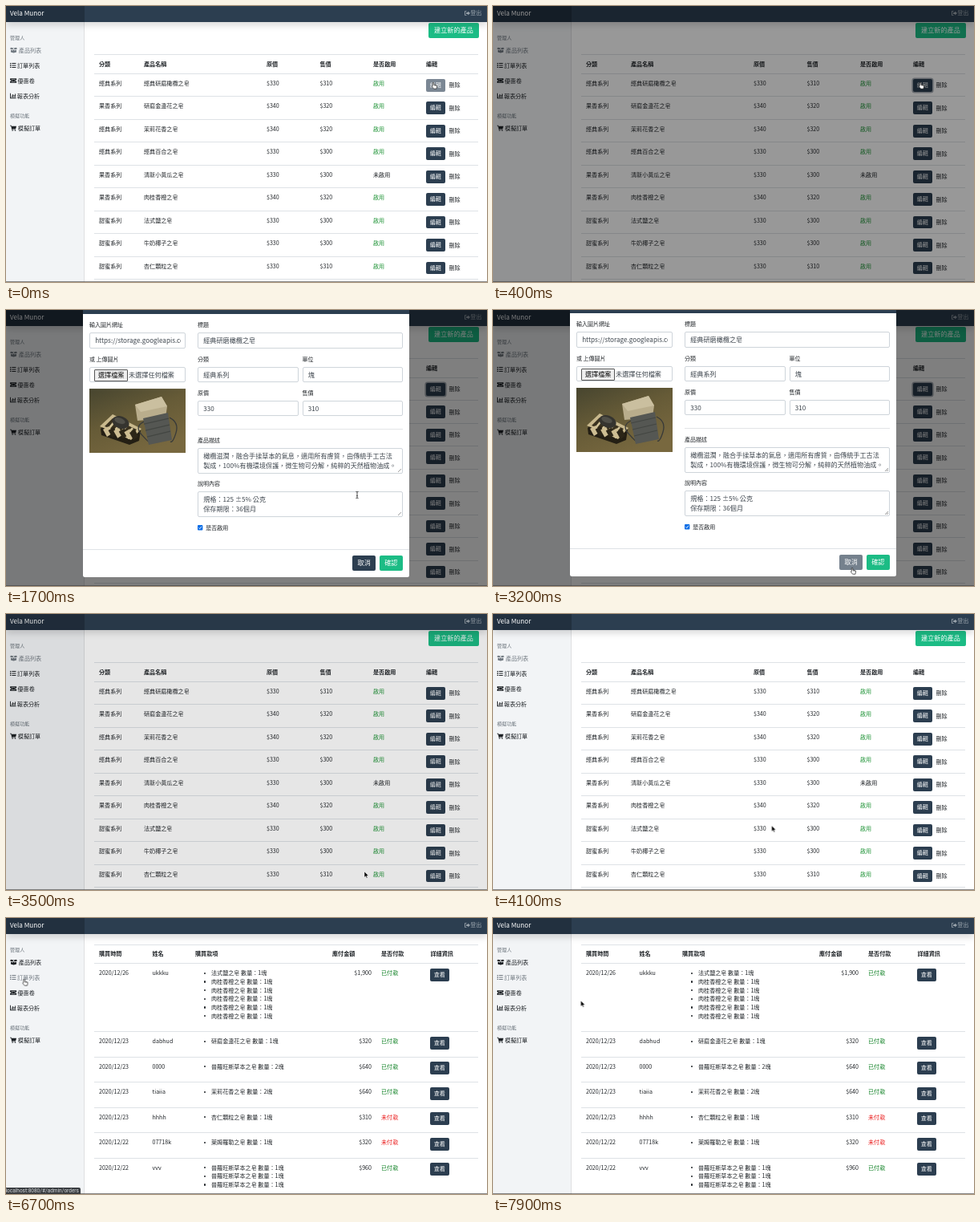
An HTML page that plays this animation: 600 px wide and 344 px high, repeating every 8 s.

```html
<!DOCTYPE html>
<html lang="zh-Hant">
<head>
<meta charset="utf-8">
<title>產品管理</title>
<style>
html, body { margin: 0; width: 100%; height: 100%; overflow: hidden; background: #fff; }
body { font-family: "Noto Sans CJK TC", "Noto Sans TC", "Noto Sans", sans-serif; color: #212529; }
#stage { position: relative; width: 600px; height: 344px; overflow: hidden; background: #fff; }
#stage div, #stage svg { position: absolute; box-sizing: border-box; }
.layer { left: 0; top: 0; width: 600px; height: 344px; }
.t { white-space: pre; line-height: 12px; height: 12px; }
.btn { border-radius: 2px; text-align: center; color: #fff; white-space: pre; font-weight: 500; }
.field { border: .6px solid #ced4da; border-radius: 2px; background: #fff; }
.grip { right: 1px; bottom: 1px; width: 4px; height: 4px;
  background: linear-gradient(135deg, transparent 48%, #999 49% 58%, transparent 59% 74%, #999 75% 84%, transparent 85%); }
svg { overflow: visible; }
</style>
</head>
<body>
<div id="stage"></div>
<script>
const LOOP = 8000;
const DARK = '#2c3e50', GREEN = '#1cbc85', GREY = '#75818d', LINE = '#dee2e6';
const stage = document.getElementById('stage');

function add(parent, cls, css = {}) {
  const el = document.createElement('div');
  el.className = cls;
  Object.assign(el.style, css);
  parent.append(el);
  return el;
}
function box(parent, x, y, w, h, css = {}, cls = '') {
  return add(parent, cls, { left: x + 'px', top: y + 'px', width: w + 'px', height: h + 'px', ...css });
}
// y is the visual middle of the line
function text(parent, x, y, str, size = 7.1, css = {}) {
  const el = add(parent, 't', { left: x + 'px', top: y - 6.4 + 'px', fontSize: size + 'px', ...css });
  el.textContent = str;
  return el;
}
function button(parent, x, y, w, h, str, size, color = DARK) {
  const el = box(parent, x, y, w, h,
    { background: color, fontSize: size + 'px', lineHeight: h - .8 + 'px' }, 'btn');
  el.textContent = str;
  return el;
}
function svg(parent, x, y, w, h, body, css = '') {
  parent.insertAdjacentHTML('beforeend',
    `<svg width="${w}" height="${h}" viewBox="0 0 ${w} ${h}" style="left:${x}px;top:${y}px;${css}">${body}</svg>`);
  return parent.lastElementChild;
}
const rule = (p, y, color = LINE, h = .7) => box(p, 110, y, 479, h, { background: color });

// steps: [ms, properties, easing to the next step]
function play(el, steps) {
  const frames = steps.map(([t, props, easing = 'step-end']) => ({ offset: t / LOOP, easing, ...props }));
  frames.push({ ...steps[steps.length - 1][1], offset: 1 });
  el.animate(frames, { duration: LOOP, iterations: Infinity });
}
const show = (el, spans) => play(el, [[0, { opacity: spans[0][0] ? 0 : 1 }],
  ...spans.flatMap(([a, b]) => [[a, { opacity: 1 }], [b, { opacity: 0 }]]).filter(s => s[0] > 0 && s[0] < LOOP)]);

/* product list */
const list = add(stage, 'layer');
button(list, 527, 20.5, 63, 19.5, '建立新的產品', 8.15, GREEN);
rule(list, 60.3);
const heads = (p, y, cols) => cols.forEach(([x, s]) => text(p, x, y, s, 7.1, { fontWeight: 700 }));
heads(list, 72, [[116, '分類'], [172, '產品名稱'], [325, '原價'], [391.5, '售價'], [458, '是否啟用'], [524, '編輯']]);
rule(list, 83.5, LINE, 1);
let firstEdit;
`經典 經典研磨橄欖 330 310
果香 研磨金盞花 340 320
經典 茉莉花香 340 320
經典 經典百合 330 300
果香 清新小黃瓜 330 300 off
果香 肉桂香橙 340 320
甜蜜 法式鹽 330 300
甜蜜 牛奶椰子 330 300
甜蜜 杏仁顆粒 330 310`.split('\n').forEach((row, i) => {
  const [kind, name, price, sale, off] = row.split(' ');
  const y = 96.2 + 28.48 * i;
  text(list, 116, y, kind + '系列');
  text(list, 172, y, name + '之皂');
  text(list, 325, y, '$' + price);
  text(list, 391.5, y, '$' + sale);
  text(list, 458, y, off ? '未啟用' : '啟用', 7.1, { color: off ? '' : '#28983f' });
  const edit = button(list, 524, y - 5.4, 23.5, 15.8, '編輯', 7.1);
  firstEdit = firstEdit || edit;
  text(list, 552.5, y + 2.5, '刪除');
  rule(list, y + 16);
});
play(firstEdit, [
  [0, { background: '#7b8794', boxShadow: 'none' }],
  [280, { background: DARK, boxShadow: '0 0 0 1.6px rgba(76,91,106,.5)' }],
  [3380, { background: DARK, boxShadow: 'none' }],
  [7999, { background: '#7b8794', boxShadow: 'none' }]]);

/* order list */
const orders = add(stage, 'layer', { opacity: 0 });
rule(orders, 32.7);
heads(orders, 44.3, [[116, '購買時間'], [182.5, '姓名'], [236, '購買款項'], [407, '應付金額'], [468, '是否付款'], [529.5, '詳細資訊']]);
rule(orders, 56, LINE, 1);
const spice = '肉桂香橙 1 ', herb = '普羅旺斯草本 1 ';
let top0 = 57;
[
  ['26', 'ukkku', '1,900', 1, '法式鹽 1 ' + spice.repeat(5)],
  ['23', 'dabhud', '320', 1, '研磨金盞花 1'],
  ['23', '0000', '640', 1, '普羅旺斯草本 2'],
  ['23', 'tiaiia', '640', 1, '茉莉花香 2'],
  ['23', 'hhhh', '310', 0, '杏仁顆粒 1'],
  ['22', '07718k', '320', 0, '萊姆羅勒 1'],
  ['22', 'vvv', '960', 1, herb.repeat(3)]
].forEach(([day, who, sum, paid, goods]) => {
  const y = top0 + 11.8, parts = goods.trim().split(' ');
  text(orders, 116, y, '2020/12/' + day);
  text(orders, 182.5, y, who);
  for (let i = 0; i < parts.length; i += 2) {
    const ly = y + 10.65 * i / 2;
    box(orders, 247, ly - 1, 2.4, 2.4, { background: '#212529', borderRadius: '50%' });
    text(orders, 256, ly, `${parts[i]}之皂 數量：${parts[i + 1]}塊`);
  }
  text(orders, 0, y, '$' + sum, 7.1, { left: 'auto', right: '144px' });
  text(orders, 468, y, paid ? '已付款' : '未付款', 7.1, { color: paid ? '#0f8024' : '#ea1c1c' });
  button(orders, 529, top0 + 6.2, 23.5, 15.8, '查看', 7.1);
  top0 += 10.65 * parts.length / 2 + 20.85;
  rule(orders, top0 - .5);
});
show(list, [[0, 6600]]);
show(orders, [[6600, LOOP]]);

/* sidebar */
const side = box(stage, 0, 0, 98, 344, { background: '#f2f4f6', boxShadow: 'inset -.7px 0 0 rgba(0,0,0,.12)' });
const ICONS = {
  open: '<path d="M4.5 1.6 1 .8 0 2.6l3.1 1zM4.5 1.6 8 .8l1 1.8-3.1 1zM1 3.7l2.4.7 1.1-1.5 1.1 1.5L8 3.7v2.7l-3.5 1L1 6.4z"/>',
  list: '<path d="M0 .9h1.4v1.4H0zM0 3.3h1.4v1.4H0zM0 5.7h1.4v1.4H0zM2.4 1.1h5v1h-5zM2.4 3.5h5v1h-5zM2.4 5.9h5v1h-5z"/>',
  ticket: '<path fill-rule="evenodd" d="M.6 1.2h7q.6 0 .6.6v1.1a1.1 1.1 0 0 0 0 2.2v1.1q0 .6-.6.6h-7q-.6 0-.6-.6V5.1a1.1 1.1 0 0 0 0-2.2V1.8q0-.6.6-.6zM1.9 2.4v3.2h4.4V2.4z"/><path d="M2.3 2.8h3.6v2.4H2.3z"/>',
  chart: '<path d="M0 .8h.9v5.5h6.6v.9H0zM1.8 3.8h.9v1.8h-.9zM3.2 2h.9v3.6h-.9zM4.6 3h.9v2.6h-.9zM6 1.4h.9v4.2H6z"/>',
  cart: '<path d="M0 .7h1.7l.3 1h6L7.2 4.9H2.8l.2.7h4v.7H2.3L1.2 1.5H0z"/><circle cx="3.1" cy="7" r=".8"/><circle cx="6.5" cy="7" r=".8"/>',
  exit: '<path d="M2.6 1v.8H1v4.4h1.6V7H.8Q.1 7 .1 6.3V1.7Q.1 1 .8 1zM4.2 1.5 7 4 4.2 6.5V5H2.1V3h2.1z"/>'
};
const icon = (p, x, y, name) => svg(p, x, y - 4, 9, 8, ICONS[name], 'fill:currentColor');
const group = (y, s) => text(side, 5, y, s, 6.1, { color: '#6c757d', fontWeight: 500 });
function link(y, name, x, label) {
  const el = box(side, 0, y - 8, 97, 16, { color: '#1d2125' });
  icon(el, 5, 8, name);
  text(el, x, 8, label, 7.1, { fontWeight: 500 });
  return el;
}
group(40.5, '管理人');
const products = link(55.3, 'open', 15.8, '產品列表');
const orderLink = link(74.2, 'list', 14, '訂單列表');
link(93, 'ticket', 14.5, '優惠卷');
link(112, 'chart', 13.8, '報表分析');
group(137, '模擬功能');
link(152, 'cart', 14.8, '模擬訂單');
const on = { color: '#727a82' }, off = { color: '#1d2125' };
play(products, [[0, on], [6600, off]]);
play(orderLink, [[0, off], [6600, on]]);

/* top bar */
const nav = box(stage, 0, 0, 600, 20.3, { background: DARK, boxShadow: '0 4px 8px rgba(0,0,0,.15)' });
box(nav, 0, 0, 98, 20.3, { background: 'rgba(0,0,0,.22)' });
text(nav, 5, 9, 'Vela Munor', 8.15, { color: '#fff' });
const exit = add(nav, '', { color: '#98a2ab' });
icon(exit, 572, 8.8, 'exit');
text(exit, 579.2, 8.8, '登出');

/* modal */
const shade = add(stage, 'layer', { background: '#000', opacity: 0 });
play(shade, [[0, { opacity: 0 }], [280, { opacity: 0 }, 'linear'], [430, { opacity: .5 }],
  [3380, { opacity: .5 }, 'linear'], [3530, { opacity: 0 }]]);

const modal = add(stage, 'layer', { opacity: 0 });
box(modal, 96, 6, 407, 360, { background: '#fff', borderRadius: '2.5px' });
box(modal, 96, 6, 407, 32, { background: DARK, borderRadius: '2.5px 2.5px 0 0' });
text(modal, 104, 22, '新增產品', 10.2, { color: '#fff', fontWeight: 700 });
svg(modal, 485, 18, 7, 7, '<path d="M.3.3 6.7 6.7M6.7.3.3 6.7" stroke="#8793a0" stroke-width="1.6" transform="translate(0 .5)"/><path d="M.3.3 6.7 6.7M6.7.3.3 6.7" stroke="#10171e" stroke-width="1.4"/>');

const label = (x, y, s) => text(modal, x, y, s, 7, { fontWeight: 500 });
function field(x, y, w, lines, h = 19.3) {
  const el = box(modal, x, y, w, h, {}, 'field');
  const clip = box(el, 6.2, 0, w - 13.2, h - 1.2, { overflow: 'hidden' });
  lines.forEach((s, i) => text(clip, 0, 9.5 + 12.2 * i, s, 8.15, { color: '#3d454d' }));
  if (h > 20) add(el, 'grip');
  return el;
}
label(104, 51.2, '輸入圖片網址');
field(104, 61.3, 120, ['https://storage.googleapis.com']);
label(104, 94, '或 上傳圖片');
field(104, 103.5, 120, []);
const pick = box(modal, 110.3, 107, 41.5, 15, { background: '#efefef', border: '.8px solid #555', borderRadius: '1px' });
text(pick, 3.6, 6.5, '選擇檔案', 8.15, { color: '#111', fontWeight: 500 });
text(modal, 153, 114, '未選擇任何檔案', 8.15, { color: '#3d454d' });
label(239, 51.2, '標題');
field(239, 61.3, 256, ['經典研磨橄欖之皂']);
label(239, 94, '分類');
field(239, 103.5, 125.5, ['經典系列']);
label(369.5, 94, '單位');
field(369.5, 103.5, 125.5, ['塊']);
label(239, 136.5, '原價');
field(239, 146, 125.5, ['330']);
label(369.5, 136.5, '售價');
field(369.5, 146, 125.5, ['310']);
box(modal, 239, 181, 256, .7, { background: '#e2e4e6' });
label(239, 195.5, '產品描述');
field(239, 205, 256, ['橄欖滋潤，融合手揉草本的氣息，適用所有膚質，由傳統手工古法',
  '製成，100%有機環境保護，微生物可分解，純粹的天然植物油成。'], 32);
label(239, 249.7, '說明內容');
field(239, 259.2, 256, ['規格：125 ±5% 公克', '保存期限：36個月'], 32);
svg(modal, 239, 301.4, 6.4, 6.4, '<rect width="6.4" height="6.4" rx="1" fill="#0b6ee6"/><path d="M1.4 3.3 2.7 4.6 5 1.7" fill="none" stroke="#fff" stroke-width=".9"/>');
label(249.3, 304.6, '是否啟用');
box(modal, 96, 330.8, 407, .7, { background: LINE });
const cancel = button(modal, 432, 338.5, 29.3, 19.3, '取消', 8.15);
button(modal, 465.7, 338.5, 29.3, 19.3, '確認', 8.15, GREEN);

// soap rack, box and cloth on a table
const slats = [0, 1, 2, 3, 4, 5].map(i =>
  `<path d="M${17 + i * 6.6} ${51 - i * .2 + i}l7-4 4 9-6 4z" fill="${i % 2 ? '#2c2618' : '#cdbd92'}"/>`).join('');
svg(modal, 104, 131, 120, 80, `
<defs><linearGradient id="wood" x1="0" y1="0" x2=".6" y2="1"><stop offset="0" stop-color="#47452f"/><stop offset=".5" stop-color="#665b37"/><stop offset="1" stop-color="#78683f"/></linearGradient></defs>
<rect width="120" height="80" fill="url(#wood)"/>
<path d="M14 50 30 35 64 52 62 65 50 70 15 58z" fill="#241f14"/>
<path d="M13 47 29 32 65 50 52 64z" fill="#c9b98d"/>
<path d="M19 47 29 37 59 51 51 59z" fill="#3a321f"/>
<path d="M24 50 33 39M31 53 40 42M38 56 47 46M45 59 54 49" stroke="#d3c499" stroke-width="2.6"/>
${slats}
<ellipse cx="39" cy="42" rx="11" ry="7.5" transform="rotate(20 39 42)" fill="#35342f"/>
<ellipse cx="38" cy="40" rx="7" ry="3.5" transform="rotate(20 38 40)" fill="#504f48"/>
<path d="M57 20 90 10 97 22 95 37 60 40z" fill="#b9ad8c"/>
<path d="M57 20 90 10 97 22 64 29z" fill="#cabf9f"/>
<path d="M68 41Q56 47 65 57T75 67M100 36Q112 42 108 55T101 66" fill="none" stroke="#383a39" stroke-width="1.3"/>
<path d="M67 37 98 30 103 64 74 70z" fill="#555753"/>
<path d="M68 44 99 37M70 52 100 45M72 60 101 53" stroke="#434642" stroke-width="1.2"/>`);

const dy = n => ({ transform: `translateY(${n}px)` });
play(modal, [[0, dy(-17)], [450, dy(-17), 'ease-out'], [750, dy(8.5)], [1050, dy(8.5), 'ease-in-out'],
  [1680, dy(-32.8), 'linear'], [1900, dy(-34)], [3210, dy(-34), 'ease-out'], [3510, dy(-59.5)]]);
play(modal, [[0, { opacity: 0 }], [450, { opacity: 0 }, 'linear'], [600, { opacity: 1 }],
  [3210, { opacity: 1 }, 'linear'], [3360, { opacity: 0 }]]);
play(cancel, [[0, { background: DARK }], [2750, { background: GREY }], [4000, { background: DARK }]]);

/* status bar, window edge */
const status = box(stage, 0, 335.5, 93, 8.5, { background: '#393c40', borderRadius: '0 2px 0 0', overflow: 'hidden' });
text(status, -.5, 4.7, 'localhost:8080/#/admin/orders', 6.5, { color: '#d0d3d6', fontFamily: 'Roboto, sans-serif', top: '-1.5px' });
show(status, [[4520, 7100]]);
box(stage, 0, 343.2, 600, .8, { background: 'rgba(60,60,60,.6)' });

/* pointer */
const pointer = box(stage, 0, 0, 8, 10);
const arrow = svg(pointer, 0, 0, 8, 10, '<path d="M0 0V7.2L1.7 5.7 2.8 8.2 4 7.7 2.9 5.3H5.2Z" fill="#000" stroke="#fff" stroke-width=".5"/>');
const hand = svg(pointer, -1, 0, 8, 10, '<path d="M2 .4q.8 0 .8.8v2l2.8.5q1.1.2 1 1.2L6 8.2H2.6L.5 5.6q-.4-.8.4-1l.4.3V1.2Q1.3.4 2 .4z" fill="#fff" stroke="#000" stroke-width=".6"/><path d="M3.9 3.6v1.3M5.1 3.8v1.2" stroke="#000" stroke-width=".4"/>');
const beam = svg(pointer, -2, -4.5, 4, 9, '<path d="M.4.3Q2 .3 2 1.3V7.7Q2 8.7.4 8.7M3.6.3Q2 .3 2 1.3M2 7.7Q2 8.7 3.6 8.7M1.2 5.6H2.8" fill="none" stroke="#222" stroke-width=".8"/>');
const at = (x, y) => ({ transform: `translate(${x}px,${y}px)` });
play(pointer, [[0, at(532, 95)], [1100, at(532, 95), 'ease-in-out'], [1600, at(438, 230)],
  [2150, at(438, 230), 'ease-in-out'], [2850, at(447, 321)], [3850, at(447, 321), 'ease-in-out'],
  [4600, at(21.5, 76)], [6950, at(21.5, 76), 'ease-in-out'], [7750, at(109.5, 103)]]);
show(hand, [[0, 430], [2750, 3380], [4520, 7100]]);
show(beam, [[1450, 2400]]);
show(arrow, [[430, 1450], [2400, 2750], [3380, 4520], [7100, LOOP]]);
</script>
</body>
</html>
```
